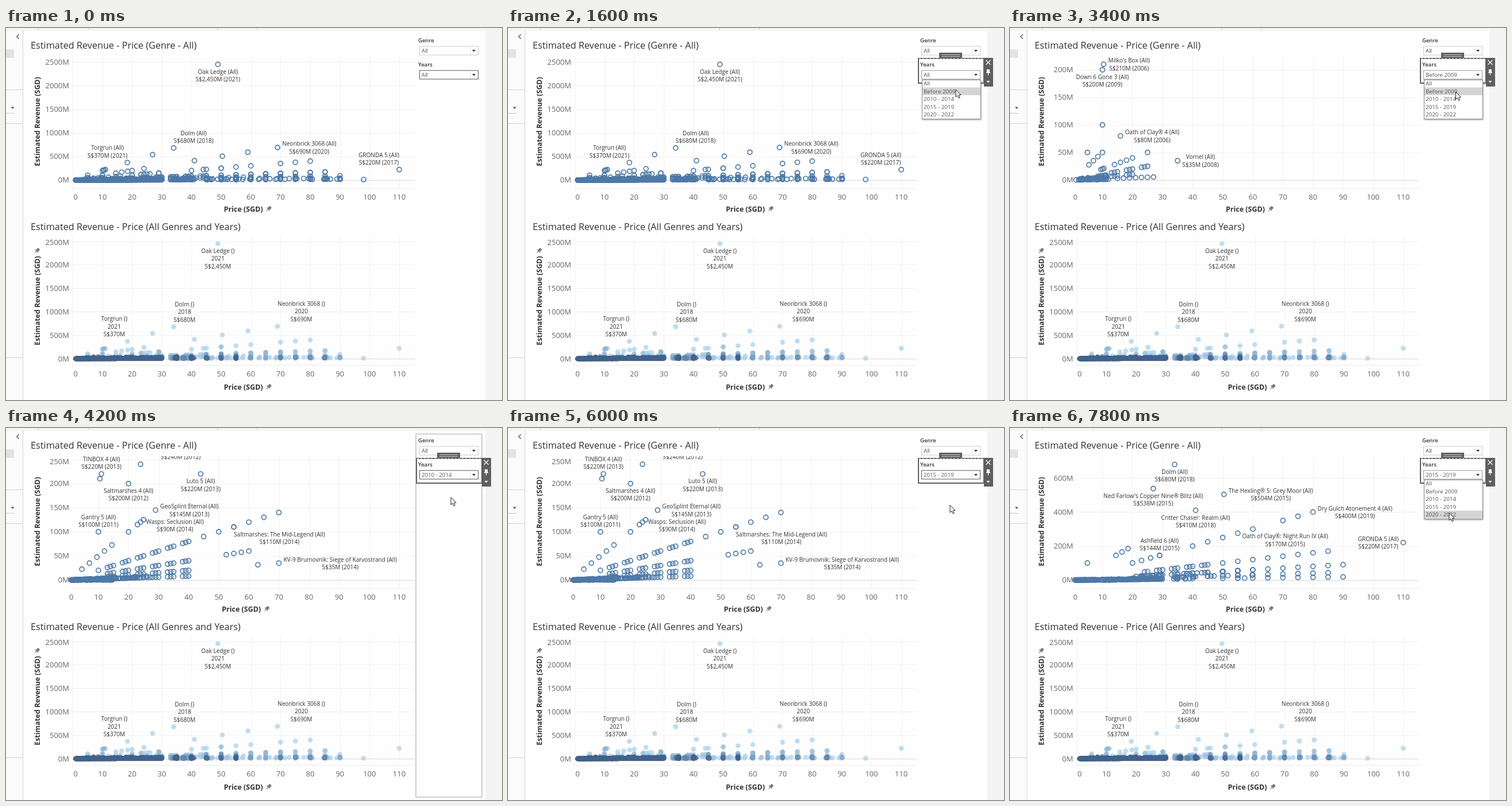
An HTML page with a canvas that plays this animation: 864x648 px, repeating every 8000 ms.

```html
<!DOCTYPE html>
<html lang="en">
<head>
<meta charset="utf-8">
<style>
html, body { margin: 0; width: 100%; height: 100%; overflow: hidden; background: #fdfefd; }
canvas { display: block; }
</style>
</head>
<body>
<canvas id="stage" width="864" height="648"></canvas>
<script>
const ctx = document.getElementById('stage').getContext('2d');
const FONT = '"Open Sans", "Noto Sans", sans-serif';
const PAGE = '#fdfefd', BLUE = '#4e79a7', DARK = '#5f5f5f', TEXT = '#333', GREY = '#666';
const YEARS = ['All', 'Before 2009', '2010 - 2014', '2015 - 2019', '2020 - 2022'];

// ---- data: points are [price, revenue], revenue = price * units sold in millions ----
let seed = 7;
const rnd = () => (seed = (seed * 16807) % 2147483647) / 2147483647;
const pick = list => list[Math.floor(rnd() * list.length)];

// One ray of equal sales; with step 1, prices sit at or just below multiples of five.
function ray(units, lo, hi = lo, step = 1) {
  const points = [];
  for (let p = lo; p <= hi; p += step) {
    if (step !== 1 || lo === hi || p % 5 === 0 || p % 5 >= 3) points.push([p, p * units]);
  }
  return points;
}
// Random games; the dearer ones often cost a multiple of five.
function crowd(n, lo, hi, units) {
  return Array.from({ length: n }, () => {
    let p = lo + (hi - lo) * rnd() ** 1.15;
    if (p > 30 && rnd() < 0.6) p = Math.round(p / 5) * 5;
    return [p, p * Math.max(pick(units), p > 15 ? 0.2 : 0)];
  });
}
const LOW = [0.02, 0.05, 0.1, 0.2, 0.3], MID = [0.2, 0.5, 1];

// Named games: era, name, price, revenue, year, label side in: era view, full view, overview
const GAMES = [
  [1, "Milko's Box", 10.4, 210, 2006, 'E'], [1, 'Down 6 Gone 3', 10, 200, 2009, 'S'],
  [1, 'Oath of Clay® 4', 16, 80, 2006, 'E'], [1, 'Vornel', 35, 35, 2008, 'E'],
  [2, 'TINBOX 4', 11, 220, 2013, 'N'], [2, 'Lantern-Patrol: Far Watch', 24, 240, 2012, 'NE'],
  [2, 'Luto 5', 44, 220, 2013, 'S'], [2, 'Saltmarshes 4', 20, 200, 2012, 'S'],
  [2, 'GeoSplint Eternal', 29, 145, 2013, 'E'], [2, 'Gantry 5', 10, 100, 2011, 'N'],
  [2, 'Wasps: Seclusion', 45, 90, 2014, 'NW'], [2, 'Saltmarshes: The Mid-Legend', 55, 110, 2014, 'SE'],
  [2, 'KV-9 Brumovnik: Siege of Karvostrand', 70, 35, 2014, 'E'],
  [3, 'Dolm', 34, 680, 2018, 'S', 'NE', 'NE'], [3, "Ned Farlow's Copper Nine® Blitz", 26.9, 538, 2015, 'S'],
  [3, 'The Hexling® 5: Grey Moor', 50.4, 504, 2015, 'E'], [3, 'Dry Gulch Atonement 4', 80, 400, 2019, 'E'],
  [3, 'Critter Chaser: Realm', 41, 410, 2018, 'S'], [3, 'Ashfield 6', 29, 144, 2015, 'N'],
  [3, 'Oath of Clay®: Night Run IV', 85, 170, 2015, 'NW'], [3, 'GRONDA 5', 110, 220, 2017, 'W', 'NW'],
  [4, 'Oak Ledge', 48.9, 2450, 2021, '', 'S', 'S'], [4, 'Torgrun', 18.4, 370, 2021, '', 'NW', 'NW'],
  [4, 'Neonbrick 3068', 69, 690, 2020, '', 'E', 'NE']
].map(([era, name, price, revenue, year, ...sides]) => ({ era, name, price, revenue, year, sides }));

const eras = [
  [ray(10, 5, 10, 5), ray(5, 5.5, 10, 1.5), ray(2, 9.5, 10.5, 0.5), ray(2, 14, 20, 2), ray(2, 25),
    ray(1, 13, 25), ray(0.5, 13, 20), ray(0.2, 15, 27, 2), ray(0.1, 1.2, 3, 0.9),
    crowd(55, 2.5, 12, [0.1, 0.2, 0.5, 0.8])],
  [ray(20, 10.5), ray(5, 4.5, 15, 2.5), ray(5, 20, 25), ray(2, 10, 40), ray(2, 50, 70, 5),
    ray(1, 13, 40), ray(1, 52.5, 60, 2.5), ray(0.5, 13, 40), ray(0.5, 63), ray(0.2, 18, 40),
    crowd(180, 1, 16, LOW), crowd(24, 15, 28, LOW)],
  [ray(20, 5), ray(10, 14.5, 18.5, 2), ray(5, 20, 29, 3), ray(5, 40, 60, 5), ray(5, 70, 75, 5),
    ray(2, 24, 45), ray(2, 50, 80, 5), ray(1, 23, 45), ray(1, 50, 90, 5), ray(0.5, 45, 85, 5),
    ray(0.2, 50, 90, 5), crowd(260, 1, 30, LOW), crowd(26, 20, 30, MID), crowd(36, 33, 42, MID), crowd(24, 45, 60, MID)],
  [ray(10, 59), ray(5, 50), ray(2, 60, 86, 5), ray(1, 65, 80, 5), ray(0.1, 98),
    crowd(180, 1, 30, LOW), crowd(20, 33, 42, LOW), crowd(26, 45, 60, LOW), crowd(36, 62, 91, [0.2, 0.4])]
].map((parts, i) => [...parts.flat(), ...GAMES.filter(g => g.era === i + 1).map(g => [g.price, g.revenue])]);

// ---- views: x0/dx map price, y0/dy map revenue ----
const wide = { x0: 116.3, dx: 5.17, nameX: 413.5, data: eras.flat() };
const upper = {
  top: 49, bottom: 279, y0: 264.8, axisY: 294, nameY: 315, titleY: 30, sideY: 163,
  title: 'Estimated Revenue - Price (Genre - All)',
  lines: g => [`${g.name} (All)`, `${money(g)} (${g.year})`]
};
const eraView = (era, dy, step, max) => ({
  ...upper, x0: 108.6, dx: 5.24, nameX: 410, data: eras[era - 1], dy, step, max,
  side: g => g.era === era && g.sides[0]
});
const views = [
  { ...upper, ...wide, dy: 0.0822, step: 500, max: 2500, side: g => g.sides[1] },
  eraView(1, 0.96, 50, 200), eraView(2, 0.84, 50, 250), eraView(3, 0.296, 200, 600)
];
const overview = {
  ...wide, top: 364, bottom: 587, y0: 576, dy: 0.0818, step: 500, max: 2500, axisY: 602,
  nameY: 625, titleY: 346, sideY: 475, filled: true, side: g => g.sides[2],
  title: 'Estimated Revenue - Price (All Genres and Years)',
  lines: g => [`${g.name} ()`, g.year, money(g)]
};
function money(g) { return `S$${g.revenue.toLocaleString('en-US')}M`; }

// ---- drawing helpers ----
function text(s, x, y, size, color = TEXT, align = 'left', weight = 400) {
  ctx.font = `${weight} ${size}px ${FONT}`;
  ctx.fillStyle = color;
  ctx.textAlign = align;
  ctx.fillText(s, x, y + size * 0.36);
}
function rect(x, y, w, h, fill, stroke, width = 1) {
  if (fill) { ctx.fillStyle = fill; ctx.fillRect(x, y, w, h); }
  if (stroke) { ctx.strokeStyle = stroke; ctx.lineWidth = width; ctx.strokeRect(x, y, w, h); }
}
function path(points, fill, stroke, width = 1) {
  ctx.beginPath();
  points.forEach(([x, y]) => ctx.lineTo(x, y));
  if (fill) { ctx.closePath(); ctx.fillStyle = fill; ctx.fill(); }
  if (stroke) { ctx.strokeStyle = stroke; ctx.lineWidth = width; ctx.stroke(); }
}
function circle(x, y, r) {
  ctx.beginPath();
  ctx.arc(x, y, r, 0, 7);
}
const arrowDown = (x, y, color) => path([[x - 3, y - 1.5], [x + 3, y - 1.5], [x, y + 2]], color);
function pin(x, y, angle, color) {
  ctx.save();
  ctx.translate(x, y);
  ctx.rotate(angle);
  rect(-2.5, -5, 5, 5, color);
  rect(-3.5, 0, 7, 1.5, color);
  rect(-0.5, 1, 1, 4.5, color);
  ctx.restore();
}

// ---- charts ----
function rings(points) {
  ctx.strokeStyle = BLUE;
  ctx.lineWidth = 1.7;
  for (const [x, y] of points) {
    circle(x, y, 4);
    ctx.stroke();
  }
}
// Dots darken with the number of neighbours.
function heatDots(points) {
  const cell = ([x, y]) => Math.round(x / 5) + ',' + Math.round(y / 5);
  const count = {};
  points.forEach(p => count[cell(p)] = (count[cell(p)] || 0) + 1);
  const ranked = points.map(p => [...p, count[cell(p)]]).sort((a, b) => a[2] - b[2]);
  ctx.globalAlpha = 0.72;
  for (const [x, y, n] of ranked) {
    const m = Math.min(1, (n - 1) / 9);
    ctx.fillStyle = `rgb(${168 - 100 * m},${206 - 108 * m},${236 - 98 * m})`;
    circle(x, y, 4.3);
    ctx.fill();
  }
  ctx.globalAlpha = 1;
}
// Place a label on a compass side of its dot.
function label(lines, side, x, y) {
  const has = c => side.includes(c) ? 1 : 0;
  const across = has('E') - has('W'), down = has('S') - has('N'), gap = 13.4;
  ctx.font = `400 10.1px ${FONT}`;
  const half = Math.max(...lines.map(s => ctx.measureText(s).width)) / 2;
  const cx = x + across * (half + (down ? 0 : 8));
  const cy = y + (down > 0 ? 12.5 : down < 0 ? -lines.length * gap + 1 : -6.5);
  lines.forEach((s, i) => text(s, cx, cy + i * gap, 10.1, TEXT, 'center'));
}
function chart(v) {
  const X = p => v.x0 + p * v.dx, Y = r => v.y0 - r * v.dy;
  text(v.title, 43, v.titleY, 16.3, TEXT, 'left', 500);
  for (let p = 0; p <= 110; p += 10) {
    if (X(p) > 115) rect(Math.round(X(p)), v.top, 1, v.bottom - v.top, '#f2f3f2');
    text(p, X(p) + (p ? 0 : 5), v.axisY, 13, GREY, 'center', 500);
  }
  for (let r = 0; r <= v.max; r += v.step) {
    rect(115, Math.round(Y(r)), 597, 1, r ? '#f2f3f2' : '#d8d8d8');
    text(r + 'M', 110, Math.max(Y(r), v.top + 9.5), 13, GREY, 'right', 500);
  }
  rect(115, v.bottom, 597, 1, '#ececec');
  text('Price (SGD)', v.nameX, v.nameY, 12.5, TEXT, 'center', 700);
  pin(v.nameX + 44, v.nameY, 0.8, '#777');
  ctx.save();
  ctx.translate(55, v.sideY);
  ctx.rotate(-Math.PI / 2);
  text('Estimated Revenue (SGD)', 0, 0, 12.4, TEXT, 'center', 700);
  ctx.restore();
  if (v.filled) pin(54, 388, 0.8, '#777');

  ctx.save();
  ctx.beginPath();
  ctx.rect(100, v.top, 620, v.bottom - v.top);
  ctx.clip();
  (v.filled ? heatDots : rings)(v.data.map(([p, r]) => [X(p), Y(r)]));
  for (const g of GAMES) {
    const side = v.side(g);
    if (side) label(v.lines(g), side, X(g.price), Y(g.revenue));
  }
  ctx.restore();
}

// ---- surroundings and filters ----
function surroundings() {
  rect(0, 0, 864, 648, PAGE);
  rect(835, 0, 29, 648, '#f3f4f3');
  rect(0, 0, 864, 5, '#f3f4f3');
  rect(0, 5, 29, 643, '#fafbfa');
  [56, 144, 368, 437].forEach(x => rect(x, 0, 1, 3, '#c8c8c8'));
  rect(29, 5, 1, 643, '#d2d2d2');
  [107, 166, 574].forEach(y => rect(0, y, 29, 1, '#d2d2d2'));
  rect(0, 148, 15, 1, '#c8c8c8');
  rect(0, 37, 14, 15, '#e3e3e3');
  path([[22.5, 11], [18.5, 15], [22.5, 19]], null, '#555', 1.2);
  arrowDown(11.5, 139, '#555');
}

const ROW = 13.5, MENU = 90;
const rowY = i => MENU + ROW * (i + 0.5);

function field(name, value, y, border) {
  text(name, 718, y, 9.5, TEXT, 'left', 600);
  rect(720.5, y + 10.5, 102, 15, '#fff', border);
  text(value, 724, y + 18, 9.7, '#555');
  rect(809, y + 12, 1, 12, '#e4e4e4');
  arrowDown(815, y + 18, TEXT);
}
function card() {
  rect(715, 53, 114, 43, PAGE, DARK, 2);
  ctx.setLineDash([3, 3]);
  path([[716, 53], [828, 53]], null, '#ddd');
  ctx.setLineDash([]);
  rect(751, 43, 40, 9, DARK);
  [46, 49].forEach(y => rect(755, y, 32, 1, '#ccc'));
  rect(829, 52, 16, 50, DARK);
  path([[832.5, 56], [840.5, 64]], null, '#fff', 1.3);
  path([[840.5, 56], [832.5, 64]], null, '#fff', 1.3);
  pin(836.5, 77, 0, '#fff');
  arrowDown(836.5, 93.5, '#fff');
}
function menu(active) {
  ctx.save();
  ctx.shadowColor = 'rgba(0,0,0,.4)';
  ctx.shadowBlur = 3;
  ctx.shadowOffsetX = ctx.shadowOffsetY = 1;
  rect(721, MENU, 102, 69, '#fff');
  ctx.restore();
  rect(721.5, MENU + 0.5, 102, 68, null, '#8a8a8a');
  rect(722, rowY(active) - ROW / 2, 101, ROW, '#d4d4d4');
  YEARS.forEach((s, i) => text(s, 724, rowY(i), 9.8, '#555'));
}
function pointer([x, y]) {
  const shape = [[0, 0], [0, 13], [3, 10.3], [5, 15], [7.2, 14], [5.2, 9.6], [9, 9.3], [0, 0]];
  path(shape.map(([a, b]) => [x + a, y + b]), '#fff', '#222');
}

// ---- timeline: each visit moves to the field, opens the menu, picks the next row ----
const OPENS = [1200, 3200, 5200, 7400];
const TRAVEL = 400, CLOSE = 600, LOAD = 1000;
const FIELD = [781, 83];
const passed = (t, delay) => OPENS.filter(open => t >= open + delay).length;
const rest = row => row ? [785 - 5 * row, rowY(row) - 3] : [800, 66];

function glide(a, b, time) {
  const u = Math.max(0, Math.min(1, time / TRAVEL)), f = 1 - (1 - u) ** 2;
  return a.map((v, i) => v + (b[i] - v) * f);
}
function pointerAt(t) {
  const visit = passed(t, -TRAVEL), open = OPENS[visit - 1];
  return t < open ? glide(rest(visit - 1), FIELD, t - open + TRAVEL) : glide(FIELD, rest(visit), t - open);
}

function draw(t) {
  const chosen = passed(t, CLOSE), shown = passed(t, LOAD);
  const open = passed(t, 0) > chosen, hover = t >= OPENS[0] - TRAVEL;
  const tip = hover ? pointerAt(t) : [0, 0];
  surroundings();
  chart(views[shown]);
  chart(overview);
  if (!open && tip[1] > 96 && chosen === shown) rect(714, 10.5, 115, 632.5, null, '#b9c1cc', 1.5);
  field('Genre', 'All', 21.5, '#ccc');
  if (hover) card();
  field('Years', YEARS[chosen], 63.5, open ? '#999' : '#555');
  if (open) menu(tip[1] < MENU ? chosen : Math.floor((tip[1] - MENU) / ROW));
  if (hover) pointer(tip);
}

let last = -1;
function tick(now) {
  const t = Math.floor((now % 8000) / 200) * 200;
  if (t !== last) draw(last = t);
  requestAnimationFrame(tick);
}
requestAnimationFrame(tick);
</script>
</body>
</html>
```
